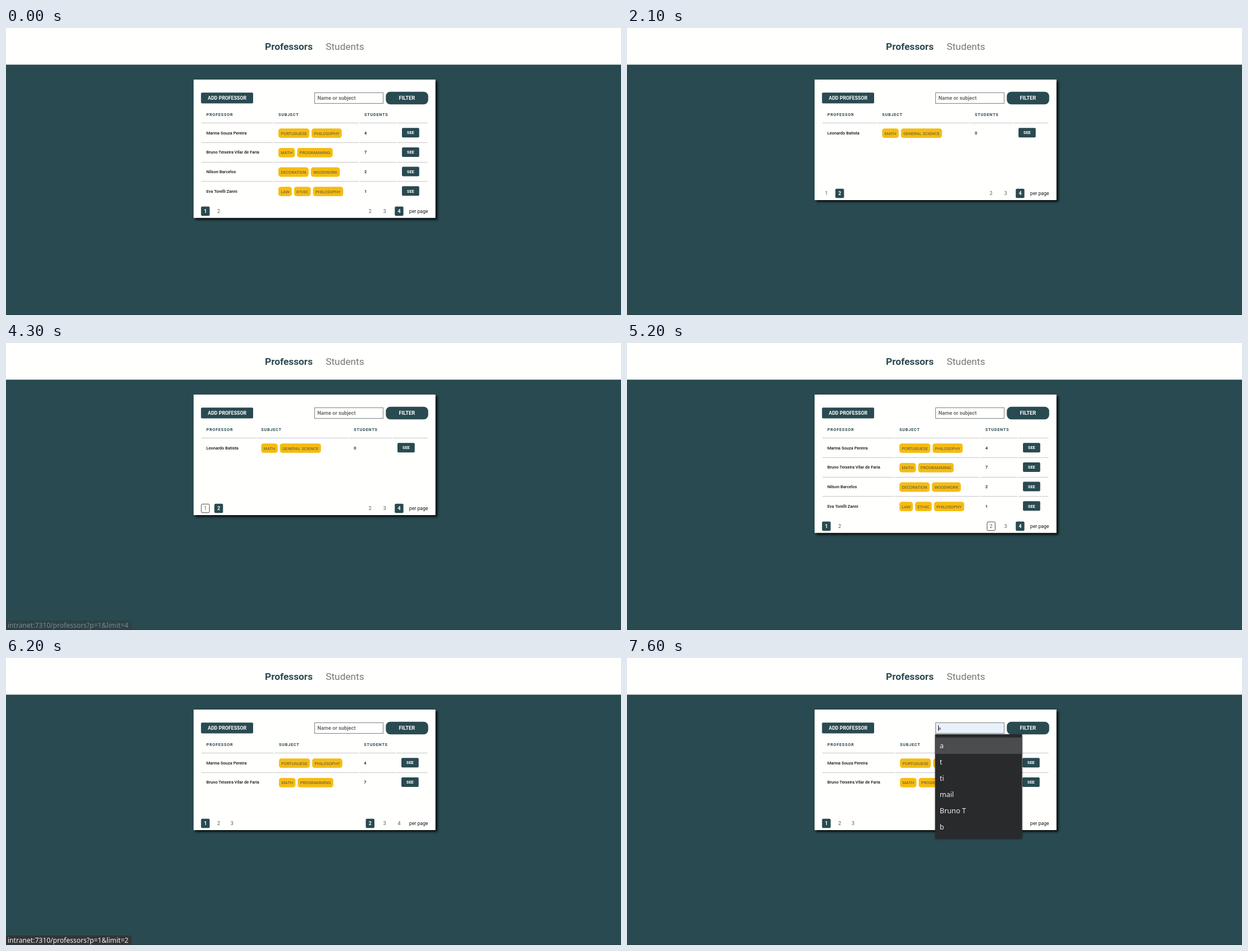
These frames come from a looping animation (1095 by 512 pixels, 8000 ms). An HTML page with a canvas:

```html
<!DOCTYPE html>
<html lang="en">
<head>
<meta charset="utf-8">
<title>Professors</title>
<style>
html, body { margin: 0; width: 100%; height: 100%; overflow: hidden; background: #294a50; }
canvas { display: block; width: 1095px; height: 512px; }
</style>
</head>
<body>
<canvas id="stage" width="1095" height="512"></canvas>
<script>
const ctx = document.getElementById('stage').getContext('2d');
const LOOP = 8000;
const TEAL = '#294a50', PAPER = '#fffffd', GOLD = '#f5bc14', GREY = '#555';
const ROBOTO = 'Roboto, Arial, sans-serif';
const SYSTEM = '"Noto Sans", "Open Sans", sans-serif';
const ROW_H = 34.7;

const people = [
  { name: 'Marina Souza Pereira', subjects: ['PORTUGUESE', 'PHILOSOPHY'], students: 4 },
  { name: 'Bruno Teixeira Vilar de Faria', subjects: ['MATH', 'PROGRAMMING'], students: 7 },
  { name: 'Nilson Barcelos', subjects: ['DECORATION', 'WOODWORK'], students: 2 },
  { name: 'Eva Torelli Zanni', subjects: ['LAW', 'ETHIC', 'PHILOSOPHY'], students: 1 },
  { name: 'Leonardo Batista', subjects: ['MATH', 'GENERAL SCIENCE'], students: 0 }
];

// cols: left edge of subject, students and button
const views = {
  firstFour: { rows: people.slice(0, 4), cols: [485, 638, 705], bottom: 338.8, pages: 2, page: 1, limit: 4 },
  lastOne: { rows: people.slice(4), cols: [454.3, 619.3, 697], bottom: 307, pages: 2, page: 2, limit: 4 },
  firstTwo: { rows: people.slice(0, 2), cols: [486, 637.3, 704], bottom: 307, pages: 3, page: 1, limit: 2 }
};

const viewKeys = [[0, 'firstFour'], [1800, 'lastOne'], [4400, 'firstFour'], [6200, 'firstTwo']];
const hoverKeys = [
  [0, ''], [1200, 'page2'], [1800, ''], [3900, 'page1'], [4400, ''],
  [5200, 'limit2'], [5400, ''], [5500, 'limit2'], [6200, '']
];
const statusKeys = [
  [0, 0], [1400, 0.35], [1500, 0.75], [1600, 1], [2000, 0.4], [2100, 0],
  [4100, 0.5], [4200, 1], [4300, 0.4], [4400, 0],
  [5700, 0.35], [5800, 0.75], [5900, 1], [6300, 0.7], [6400, 0.35], [6500, 0]
];
const linkKeys = [[0, 'p=2&limit=4'], [3000, 'p=1&limit=4'], [5000, 'p=1&limit=2']];
const menuKeys = [[0, 0], [7300, 0.6], [7400, 1]];

function at(keys, t) {
  let value = keys[0][1];
  for (const [time, v] of keys) if (t >= time) value = v;
  return value;
}

function box(x, y, w, h, r, fill) {
  ctx.fillStyle = fill;
  ctx.beginPath();
  ctx.roundRect(x, y, w, h, r);
  ctx.fill();
}

function text(str, x, y, font, color, align = 'left', spacing = 0) {
  ctx.font = font;
  ctx.fillStyle = color;
  ctx.textAlign = align;
  ctx.letterSpacing = spacing + 'px';
  ctx.fillText(str, x, y);
}

const bold = size => `bold ${size}px ${ROBOTO}`;
const medium = size => `500 ${size}px ${ROBOTO}`;
const plain = size => `${size}px ${ROBOTO}`;

function header() {
  ctx.fillStyle = TEAL;
  ctx.fillRect(0, 0, 1095, 512);
  ctx.fillStyle = '#213d43';
  ctx.fillRect(0, 511, 1095, 1);
  ctx.fillStyle = PAPER;
  ctx.fillRect(0, 0, 1095, 65);
  ctx.fillStyle = '#7d9092';
  ctx.fillRect(0, 65, 1095, 1);
  text('Professors', 461, 39, bold(17.3), TEAL);
  text('Students', 569.2, 39, plain(17.3), '#777');
}

function card(bottom) {
  ctx.save();
  ctx.shadowColor = 'rgba(0,0,0,.85)';
  ctx.shadowBlur = 4;
  ctx.shadowOffsetX = ctx.shadowOffsetY = 3.2;
  ctx.fillStyle = PAPER;
  ctx.fillRect(334, 92, 430.7, bottom - 92);
  ctx.restore();
}

function toolbar(preview, caret) {
  box(347.2, 115.2, 92.8, 19.3, 2, TEAL);
  text('ADD PROFESSOR', 393.7, 127.8, bold(8.75), PAPER, 'center');
  ctx.fillStyle = preview ? '#e8f0fa' : PAPER;
  ctx.fillRect(549, 115, 123, 20);
  ctx.strokeStyle = '#7c8285';
  ctx.lineWidth = 1;
  ctx.strokeRect(549.5, 115.5, 122, 19);
  if (preview) text('a', 554.8, 127.6, plain(7.5), '#222');
  else text('Name or subject', 554.4, 127.7, medium(9.1), GREY, 'left', 0.08);
  if (caret) {
    ctx.fillStyle = '#111';
    ctx.fillRect(554, 120, 1, 10);
  }
  box(676.3, 113.7, 75.4, 22.6, 8, TEAL);
  text('FILTER', 713.8, 127.8, bold(9.3), PAPER, 'center');
}

function rule(y, cols) {
  const edges = [348, ...cols.map(x => x - 8.9), 751.2];
  ctx.fillStyle = '#c4c6c6';
  for (let i = 0; i < 4; i++) {
    const x = edges[i] + (i ? 0.8 : 0);
    ctx.fillRect(x, y, edges[i + 1] - 0.8 - x, 1);
  }
}

function pills(list, x, y) {
  for (const label of list) {
    ctx.font = plain(7.5);
    ctx.letterSpacing = '0px';
    const w = ctx.measureText(label).width + 8.5;
    box(x, y, w, 16.8, 4.4, GOLD);
    text(label, x + 4.25, y + 11.4, plain(7.5), '#5f5638');
    x += w + 4.1;
  }
}

function table({ rows, cols }) {
  ['PROFESSOR', 'SUBJECT', 'STUDENTS'].forEach((label, i) =>
    text(label, [356.7, cols[0], cols[1]][i], 157.2, bold(7.2), TEAL, 'left', 0.8));
  rows.forEach((row, i) => {
    const y = i * ROW_H;
    rule(Math.round(169.2 + y), cols);
    text(row.name, 356.7, 189.5 + y, medium(7.5), '#111');
    pills(row.subjects, cols[0], 179.2 + y);
    text(row.students, cols[1], 189.5 + y, medium(7.5), '#111');
    box(cols[2], 178.2 + y, 30.7, 17, 2, TEAL);
    text('SEE', cols[2] + 15.3, 189.4 + y, bold(7.5), PAPER, 'center');
  });
}

function pagerItem(n, x, y, active, hover) {
  if (active) box(x - 7.7, y - 8.2, 15.4, 16.4, 2, TEAL);
  else if (hover) {
    ctx.strokeStyle = '#4a4a4a';
    ctx.lineWidth = 1;
    ctx.beginPath();
    ctx.roundRect(x - 7.2, y - 7.7, 14.4, 15.4, 2);
    ctx.stroke();
  }
  text(n, x, y + 3.2, active ? bold(8.8) : plain(8.8), active ? PAPER : GREY, 'center');
}

function pager(view, hover) {
  const y = view.bottom - 12;
  for (let n = 1; n <= view.pages; n++)
    pagerItem(n, 331.2 + n * 23.75, y, n === view.page, hover === 'page' + n);
  for (let n = 2; n <= 4; n++)
    pagerItem(n, 596.7 + n * 25.8, y, n === view.limit, hover === 'limit' + n);
  text('per page', 717.8, y + 3.2, plain(8.7), '#1a1a1a');
}

function statusBar(alpha, query) {
  if (!alpha) return;
  ctx.save();
  ctx.globalAlpha = alpha;
  box(0, 495, 223.5, 17, [0, 3, 0, 0], '#333537');
  text('intranet:7310/professors?' + query, 3, 508, '12.1px ' + SYSTEM, '#f2f2f2');
  ctx.restore();
}

function menu(alpha, selected) {
  if (!alpha) return;
  ctx.save();
  ctx.globalAlpha = alpha;
  ctx.shadowColor = 'rgba(0,0,0,.5)';
  ctx.shadowBlur = 3;
  ctx.shadowOffsetY = 1;
  ctx.fillStyle = '#282a2b';
  ctx.fillRect(548.5, 136, 155, 186);
  ctx.shadowColor = 'transparent';
  if (selected) {
    ctx.fillStyle = '#4a4c4d';
    ctx.fillRect(548.5, 142, 155, 29);
  }
  ['a', 't', 'ti', 'mail', 'Bruno T', 'b'].forEach((label, i) =>
    text(label, 556.7, 161 + i * 29, '12.6px ' + SYSTEM, '#f0f0f0'));
  ctx.restore();
}

function draw(t) {
  const view = views[at(viewKeys, t)];
  const selected = t >= 7600;
  header();
  card(view.bottom);
  toolbar(selected, t >= 7300);
  table(view);
  pager(view, at(hoverKeys, t));
  statusBar(at(statusKeys, t), at(linkKeys, t));
  menu(at(menuKeys, t), selected);
}

const start = performance.now();
function tick(now) {
  draw(Math.max(0, now - start) % LOOP);
  requestAnimationFrame(tick);
}
draw(0);
requestAnimationFrame(tick);
</script>
</body>
</html>
```
